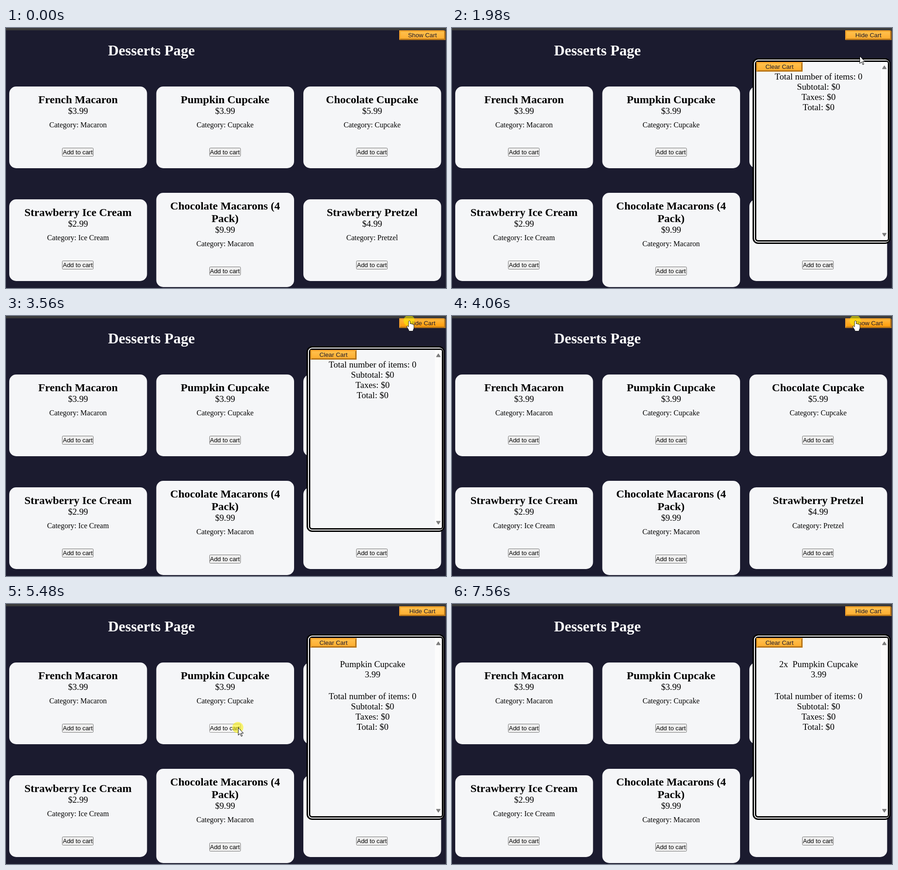
Animation of 950 by 560 pixels, one loop 7640 ms. Source, as an HTML page:

```html
<!DOCTYPE html>
<html lang="en">
<head>
<meta charset="utf-8">
<title>Desserts Page</title>
<style>
html, body { margin: 0; width: 100%; height: 100%; overflow: hidden; background: #1b1b2f; }
svg { display: block; }
text { font: 19.2px "Liberation Serif", serif; text-anchor: middle; }
.title { font-size: 32px; font-weight: bold; fill: #fff; }
.name { font-size: 24px; font-weight: bold; }
.category { font-size: 16px; }
.label { font: 13.333px "Liberation Sans", sans-serif; }
.orange { fill: #1b1b2f; }
.add { fill: #efefef; stroke: #767676; }
.add.hover { fill: #e5e5e5; stroke: #4f4f4f; }
.add.active { fill: #f5f5f5; stroke: #8d8d8d; }
</style>
</head>
<body>
<svg id="stage" width="950" height="560" viewBox="0 0 950 560"></svg>
<script>
const LOOP = 7640, TICK = 1000 / 12;

const text = (x, y, value, cls = '') => `<text x="${x}" y="${y}" class="${cls}">${value}</text>`;
const box = (x, y, w, h, fill, r = 0) =>
  `<rect x="${x}" y="${y}" width="${w}" height="${h}" rx="${r}" fill="${fill}"/>`;

const gradient = (id, top, bottom) =>
  `<linearGradient id="${id}" x2="0" y2="1"><stop stop-color="${top}"/><stop offset="1" stop-color="${bottom}"/></linearGradient>`;

// 100 x 21 button with a 3px outset border
const orangeButton = (id, x, y, label) => `<g transform="translate(${x} ${y})">
  <path d="M0 21V0H100L97 3H3V18Z" fill="#ffa62b"/>
  <path d="M100 0V21H0L3 18H97V3Z" fill="#b87619"/>
  <rect id="${id}" x="3" y="3" width="94" height="15"/>
  <text id="${id}Label" x="50" y="15" class="label orange">${label}</text></g>`;

function card(column, y, lines, price, category) {
  const x = 7 + 317.5 * column, mid = x + 148.5, extra = 27 * (lines.length - 1);
  const top = y + extra;
  return box(x, y, 297.5, 176 + extra, '#f5f6f8', 15) +
    lines.map((line, i) => text(mid, y + 36 + 27 * i, line, 'name')).join('') +
    text(mid, top + 59, '$' + price) +
    text(mid, top + 88, 'Category: ' + category, 'category') +
    `<rect class="add" x="${Math.round(mid - 34.5) + .5}" y="${top + 132.5}" width="67" height="18" rx="2"/>` +
    text(mid - .5, top + 146, 'Add to cart', 'label');
}

const totals = ['Total number of items: 0', 'Subtotal: $0', 'Taxes: $0', 'Total: $0'];

stage.innerHTML = `<defs>${gradient('idle', '#ffc04d', '#ffae30')}${gradient('hot', '#ffb73b', '#ff9c0a')}</defs>` +
  box(0, 0, 950, 560, '#1b1b2f') +
  text(314, 59, 'Desserts Page', 'title') +
  card(0, 126, ['French Macaron'], 3.99, 'Macaron') +
  card(1, 126, ['Pumpkin Cupcake'], 3.99, 'Cupcake') +
  card(2, 126, ['Chocolate Cupcake'], 5.99, 'Cupcake') +
  card(0, 369, ['Strawberry Ice Cream'], 2.99, 'Ice Cream') +
  card(1, 355, ['Chocolate Macarons (4', 'Pack)'], 9.99, 'Macaron') +
  card(2, 369, ['Strawberry Pretzel'], 4.99, 'Pretzel') +
  box(949, 5, 1, 555, '#33333f') +
  orangeButton('toggle', 849, 5, 'Show Cart') +
  box(0, 0, 950, 5, '#3c3c3c') +
  '<path d="M944 5h6v6q0-6-6-6" fill="#3c3c3c"/>' +
  '<g id="cart">' +
    box(649, 65, 298, 400, '#000', 12) + box(652, 68, 292.5, 394, '#fff', 9) +
    box(654, 70, 290, 390, '#000', 7) + box(657, 73, 284, 384, '#f5f6f8', 4) +
    box(926, 73, 15, 384, '#fcfcfc', 3) +
    '<path d="M929 88l4.5-7 4.5 7zM929 442l4.5 7 4.5-7z" fill="#7d7d7d" stroke="#7d7d7d" stroke-linejoin="round"/>' +
    orangeButton('clear', 657, 73, 'Clear Cart') +
    `<g id="item">${text(791.5, 136, '')}${text(791.5, 158, '3.99')}</g>` +
    `<g id="totals">${totals.map((line, i) => text(791.5, 111 + 22 * i, line)).join('')}</g>` +
  '</g>' +
  '<circle id="press" r="12" fill="#faf000" fill-opacity=".55"/>' +
  `<g id="cursor" fill="#fff" stroke="#000" stroke-linejoin="round">
    <path id="arrow" d="M.5 .5V16.5L4.3 13L7 19L9.3 18L6.7 12.2H11.5Z"/>
    <path id="hand" stroke-width=".8" d="M-1.8 1.5Q0-1 1.8 1.5V7Q4 5.6 5 7.6Q7 6.4 7.8 8.6Q9.8 8 9.8 10.5V15Q9.6 18 8 20V22.5H-1.2V20.5L-5.4 13.8Q-6.2 11-3.8 11.4L-1.8 13.4Z"/>
  </g>`;

// tick, x, y of the pointer tip
const path = [
  [5, 842, 538], [8, 838, 330], [11, 858, 80], [13, 872, 16], [16, 872, 16], [17, 866, 18],
  [22, 866, 18], [24, 880, 60], [27, 866, 225], [29, 800, 215], [32, 738, 96], [33, 700, 84],
  [34, 676, 85], [36, 760, 77], [39, 840, 50], [42, 871, 10], [50, 871, 10], [52, 770, 100],
  [55, 504, 268], [59, 501, 266], [69, 501, 266], [70, 515, 300], [72, 551, 474]
];

function pointer(tick) {
  const i = Math.max(1, path.findIndex(p => p[0] >= tick));
  const [t0, x0, y0] = path[i - 1], [t1, x1, y1] = path[i];
  const k = (tick - t0) / (t1 - t0);
  return [x0 + (x1 - x0) * k, y0 + (y1 - y0) * k];
}

const show = (el, on) => el.setAttribute('display', on ? 'inline' : 'none');
const heat = (el, on) => el.setAttribute('fill', `url(#${on ? 'hot' : 'idle'})`);
const cupcakeAdd = document.querySelectorAll('.add')[1];

function draw(now) {
  const tick = Math.floor((now % LOOP + 28) / TICK);
  const within = (from, to) => tick >= from && tick <= to;

  const open = within(20, 43) || tick >= 50;
  show(cart, open);
  toggleLabel.textContent = open ? 'Hide Cart' : 'Show Cart';
  const overToggle = within(13, 23) || within(41, 50);
  heat(toggle, overToggle);
  heat(clear, within(33, 36));

  const added = tick >= 60;
  show(item, added);
  item.firstChild.textContent = (tick >= 67 ? '2x\u00a0 ' : '') + 'Pumpkin Cupcake';
  totals_.setAttribute('transform', `translate(0 ${added ? 94 : 0})`);
  const pressed = tick === 59 || tick === 66;
  cupcakeAdd.setAttribute('class', 'add' + (pressed ? ' active' : within(55, 69) ? ' hover' : ''));

  const visible = within(5, 72);
  show(cursor, visible);
  show(press, pressed || tick === 19 || within(43, 44) || within(48, 49) || tick === 67);
  if (visible) {
    const [x, y] = pointer(tick);
    const overClear = within(33, 35);
    show(hand, overToggle || overClear);
    show(arrow, !overToggle && !overClear);
    cursor.setAttribute('transform', `translate(${x} ${y})`);
    press.setAttribute('transform', `translate(${x - .5} ${y})`);
  }
  requestAnimationFrame(draw);
}

const totals_ = document.getElementById('totals');
const start = performance.now();
requestAnimationFrame(function first() { tickFrom(); });
function tickFrom() {
  const loop = () => draw(performance.now() - start);
  const raf = window.requestAnimationFrame.bind(window);
  window.requestAnimationFrame = () => raf(loop);
  loop();
}
</script>
</body>
</html>
```
